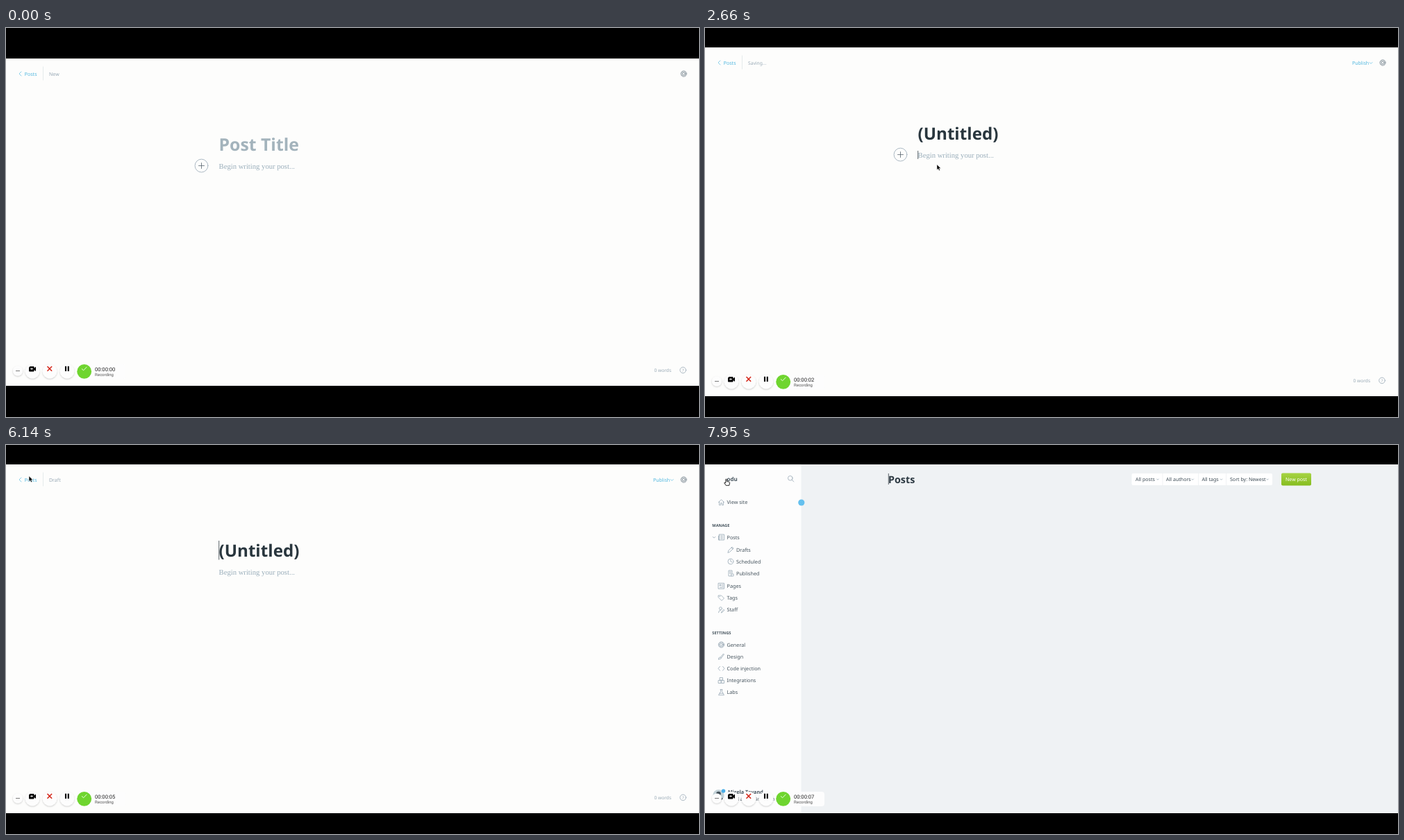
An HTML page for the animation above (8000 ms loop, 998 by 561 pixels).

```html
<!DOCTYPE html>
<html lang="en">
<head>
<meta charset="utf-8">
<title>Post editor recording</title>
<style>
  html, body { margin: 0; height: 100%; overflow: hidden; background: #000; }
  svg { display: block; width: 100vw; height: 100vh; }
  text { font: 7px "Noto Sans", "Open Sans", sans-serif; fill: #98a9b5; text-rendering: geometricPrecision; white-space: pre; }
  .line { fill: none; stroke: #98a9b5; stroke-width: .8; stroke-linecap: round; stroke-linejoin: round; }
  .blue { fill: #50b7df; }
  .line.blue { fill: none; stroke: #6cc3e5; }
  .title { font-weight: 700; }
  .body { font: 10.65px "Liberation Serif", serif; fill: #9aaebb; }
  .rec { font-family: Roboto, sans-serif; fill: #222; }
  .nav { font-size: 7.25px; fill: #46545e; }
  .section { font-size: 5.7px; font-weight: 700; fill: #46545e; }
  .filter { font-size: 7.05px; font-weight: 500; fill: #3c4a54; }
  .caret { stroke: #333d43; stroke-width: .8; }
</style>
</head>
<body>
<svg viewBox="0 0 998 561">
  <defs>
    <filter id="shadow" x="-40%" y="-40%" width="180%" height="190%">
      <feDropShadow dx="0" dy="1" stdDeviation="1" flood-opacity=".22"/>
    </filter>
    <linearGradient id="green" x2="0" y2="1">
      <stop stop-color="#a6d343"/><stop offset="1" stop-color="#86bd20"/>
    </linearGradient>
    <clipPath id="avatar"><circle cx="19.5" cy="505" r="8"/></clipPath>
    <g id="cog">
      <circle r="1.7"/><circle r="3.2"/>
      <circle r="4.2" stroke-dasharray="2.2 1.1"/>
    </g>
  </defs>
  <rect width="998" height="561"/>
  <rect id="page" width="998" fill="#fdfdfc"/>

  <g id="editor">
    <g id="head">
      <path class="line blue" d="M22 19l-3 3 3 3"/>
      <text class="blue" x="26.8" y="24.5">Posts</text>
      <path class="line" style="stroke:#dfe5e8" d="M53.5 12V31"/>
      <text id="status" x="62" y="24.5"></text>
      <g id="publish">
        <text class="blue" x="932" y="24.5">Publish</text>
        <path class="line blue" d="M957 21.5l2 2 2-2"/>
      </g>
      <use href="#cog" class="line" x="976" y="22" style="stroke:#87949c"/>
      <text id="title" class="title" x="306.5" y="133"></text>
      <text class="body" x="306.6" y="158.5">Begin writing your post...</text>
      <g id="plus">
        <circle class="line" cx="281.5" cy="154.6" r="9.4"/>
        <path class="line" style="stroke:#56636b" d="M277.5 154.6h8m-4-4v8"/>
      </g>
      <path id="bodyCaret" class="caret" d="M306.7 149v12"/>
      <path id="titleCaret" class="caret" d="M306.7 110v27.5"/>
      <rect id="focus" class="line blue" x="18" y="16.4" width="27" height="11" stroke-dasharray="2 1.5"/>
    </g>
    <g id="foot">
      <text x="933.6" y="-20" style="font-size:6.6px">0 words</text>
      <circle class="line" cx="975" cy="-22.6" r="4.3"/>
      <text x="975" y="-20.4" text-anchor="middle" style="font-size:6px">?</text>
    </g>
  </g>

  <g id="list">
    <rect y="28" width="998" height="503" fill="#eff2f4"/>
    <rect y="28" width="138.5" height="503" fill="#fdfdfd"/>
    <g id="sidebar">
      <text class="nav" x="31.5" y="52" style="font-weight:700;font-size:8px">odu</text>
      <circle class="line" cx="122.8" cy="47.8" r="3.3"/><path class="line" d="M125.2 50.2l2.6 2.8"/>
      <circle cx="138.8" cy="83" r="4.6" fill="#64c0ee"/>
      <text class="section" x="10.3" y="117.7">MANAGE</text>
      <text class="section" x="10.3" y="272.8">SETTINGS</text>
      <path class="line" d="M11.3 132.3l1.8 1.8 1.8-1.8"/>
      <g clip-path="url(#avatar)">
        <rect x="11" y="496" width="17" height="18" fill="#c4d3d9"/>
        <circle cx="19.5" cy="503" r="3.3" fill="#435159"/>
        <ellipse cx="19.5" cy="512" rx="6.5" ry="5" fill="#435159"/>
      </g>
      <circle cx="26.5" cy="499" r="2.8" fill="#4aaee8"/>
      <text class="nav" x="33" y="503" style="font-weight:700">Mirela Tovand</text>
      <text class="nav" x="33" y="513" style="font-size:6.6px">mirel at quellin &amp; wend</text>
    </g>
    <g id="postsHeader">
      <path class="caret" d="M264.3 41v16"/>
      <text class="title" x="264" y="54.5" style="font-size:14.3px;fill:#2d3a43">Posts</text>
      <rect x="614.5" y="41" width="202.5" height="17" rx="2" fill="#fff"/>
      <path class="line" style="stroke:#edf0f2" d="M659 41v17M710.5 41v17M750.5 41v17"/>
      <rect x="830" y="40.5" width="43" height="18" rx="2" fill="url(#green)"/>
      <text x="836" y="52" style="fill:#fff;font-weight:500">New post</text>
    </g>
  </g>

  <g id="recorder">
    <rect x="100" y="-31" width="72" height="21" rx="4" fill="#fdfdfd"/>
    <g fill="#fdfdfd" filter="url(#shadow)">
      <circle cx="17" cy="-21.5" r="7"/>
      <circle cx="38" cy="-21" r="10.3"/>
      <circle cx="63" cy="-21" r="10.3"/>
      <circle cx="88" cy="-21" r="10.3"/>
    </g>
    <circle cx="112.7" cy="-20.6" r="10.4" fill="#6fd52f"/>
    <path d="M14.4 -21.5h1.2m.8 0h1.2m.8 0h1.2" stroke="#222" stroke-width="1.2"/>
    <path d="M34 -28h5.5q1 0 1 1v1.6l2.5-2v6.4l-2.5-2v1.5q0 1-1 1h-5.5q-1 0-1-1v-4.5q0-1 1-1z"/>
    <path d="M35 -24.5h4m-2-1.7v3.4" stroke="#fff" stroke-width=".8"/>
    <path d="M59.5 -28l6.6 6.8m0-6.8l-6.6 6.8" stroke="#d52b1e" stroke-width="1.6"/>
    <path d="M86 -28.3v7.4m3.8-7.4v7.4" stroke="#000" stroke-width="2.1"/>
    <path d="M109 -24.6l2.6 2.4 4.8-5" fill="none" stroke="#e9ffdd" stroke-width="1"/>
    <text id="timer" class="rec" x="128" y="-21" style="font-size:7.6px"></text>
    <text class="rec" x="128" y="-13.6" style="font-size:6px;fill:#555">Recording</text>
  </g>

  <path id="arrow" d="M0 0v7.8l1.8-1.6 1.3 2.7 1.4-.7-1.3-2.5h2.5z" stroke="#fff" stroke-width=".5"/>
  <path id="hand" d="M-.8 0q.9-.8 1.6.2v2.8l3.4.8q1 .4.8 1.4l-.8 3.6h-4.6l-2.4-3.4q0-1.2 1.2-.7l.8.6z" fill="#fff" stroke="#111" stroke-width=".9"/>
</svg>
<script>
const $ = id => document.getElementById(id);
const show = (id, on) => $(id).style.display = on ? '' : 'none';
const move = (id, x, y) => $(id).setAttribute('transform', `translate(${x} ${y})`);
const add = (parent, markup) => $(parent).insertAdjacentHTML('beforeend', markup);

// Line icons, drawn around their centre.
const icons = {
  home: 'M-4 0L0-4 4 0M-3-1v5h2V1h2v3h2v-5',
  post: 'M-3-4h7v8h-8v-6h1zM-3-2v6M-1-2h3M-1 0h3M-1 2h3',
  pencil: 'M-4 4l1-3 5-5 2 2-5 5zM1-3l2 2',
  clock: 'M4 0a4 4 0 1 1-8 0a4 4 0 1 1 8 0M0-2.5v2.5l2 1',
  published: 'M1 4h-4v-8h5v4M-1.5-2h2M-1.5 0h2M1 1h3v3h-3z',
  page: 'M-4-4h8v8h-8zM-2-2h1.5v1.5h-1.5zM1-2h1.5M1 0h1.5M-2 2h4.5',
  tag: 'M-4-3.5h4l4 4-3.5 3.5-4.5-4.5zM-2.5-2h.5',
  staff: 'M1-2a2 2 0 1 1-4 0a2 2 0 1 1 4 0M-4 4q0-3.5 3-3.5M0 4l1-2 2.5-2.5 1 1-2.5 2.5z',
  brush: 'M-4 4q0-3 2-3l2 1q0 2-4 2M-1 1l4-5 1 1-4 5',
  code: 'M-2-3l-2.5 3 2.5 3M2-3l2.5 3-2.5 3',
  blocks: 'M-2-4h4v3.5h-4zM-4 0h3.5v4h-3.5zM.5 0h3.5v4h-3.5z',
  flask: 'M-1.5-4h3M-1-4v3l-3 5h8l-3-5v-3M-2.5 1.5h5'
};
const navItems = [
  ['View site', 'home', 82.7], ['Posts', 'post', 133],
  ['Drafts', 'pencil', 151, 13.5], ['Scheduled', 'clock', 168, 13.5], ['Published', 'published', 185, 13.5],
  ['Pages', 'page', 203.3], ['Tags', 'tag', 220.5], ['Staff', 'staff', 237.7],
  ['General', 'cog', 288], ['Design', 'brush', 305], ['Code injection', 'code', 322.3],
  ['Integrations', 'blocks', 339.5], ['Labs', 'flask', 356.7]
];
for (const [label, icon, y, indent = 0] of navItems) {
  const x = 23.5 + indent;
  add('sidebar', `<text class="nav" x="${x + 8}" y="${y + 2.5}">${label}</text>` +
    (icon === 'cog' ? `<use href="#cog" class="line" x="${x}" y="${y}"/>`
      : `<path class="line" transform="translate(${x} ${y})" d="${icons[icon]}"/>`));
}
const filters = [['All posts', 620, 652], ['All authors', 664, 702.3], ['All tags', 715.5, 743.5], ['Sort by: Newest', 756, 810]];
for (const [label, x, chevron] of filters) {
  add('postsHeader', `<text class="filter" x="${x}" y="52">${label}</text>
    <path class="line" d="M${chevron - 1.3} 49l1.3 1.3 1.3-1.3"/>`);
}

// Pointer waypoints: time, x, y.
const pointer = [
  [1160, 998, 520], [1220, 993, 514], [1730, 520, 290], [1960, 520, 290], [2230, 334, 197],
  [2660, 334, 197], [2950, 326, 156], [3060, 326, 156], [3450, 92, 62], [3510, 88, 58],
  [3730, 68, 42], [3970, 50, 31], [4250, 34, 43], [6070, 34, 43], [6330, 30.6, 49.5]
];
const clamp = v => Math.max(0, Math.min(1, v));

function pointerAt(t) {
  const next = pointer.findIndex(p => p[0] > t);
  if (next < 1) return (next ? pointer.at(-1) : pointer[0]).slice(1);
  const [t0, x0, y0] = pointer[next - 1], [t1, x1, y1] = pointer[next];
  const k = (t - t0) / (t1 - t0);
  return [x0 + (x1 - x0) * k, y0 + (y1 - y0) * k];
}

function render(t) {
  const grow = clamp((t - 970) / 760);
  const top = Math.round(44 - 16 * grow), bottom = Math.round(516 + 15 * grow);
  $('page').setAttribute('y', top);
  $('page').setAttribute('height', bottom - top);
  move('head', 0, top);
  move('foot', 0, bottom);
  move('recorder', 0, bottom);

  const untitled = t >= 2390, titleFocused = t >= 3010;
  $('status').textContent = t < 2390 ? 'New' : t < 5570 ? 'Saving...' : 'Draft';
  $('status').style.fontSize = untitled && t < 5570 ? '6.7px' : '7px';
  $('title').textContent = untitled ? '(Untitled)' : 'Post Title';
  $('title').style.fontSize = untitled ? '24.2px' : '24.8px';
  $('title').style.fill = untitled ? '#29363e' : '#a3b3bc';
  $('timer').textContent = '00:00:0' + Math.max(0, Math.floor((t - 210) / 1000));

  const blink = Math.floor((t - 4810) / 600) % 2 === 0;
  show('bodyCaret', blink && t >= 2390 && !titleFocused);
  show('titleCaret', blink && titleFocused && t < 7400);
  show('plus', !titleFocused);
  show('publish', t >= 2660);
  show('focus', t >= 7400);
  show('editor', t < 7750);
  show('list', t >= 7750);
  show('postsHeader', t >= 7950);

  const [x, y] = pointerAt(t);
  show('arrow', t >= 1160 && t < 6200);
  show('hand', t >= 6200);
  move('arrow', x, y);
  move('hand', x, y);
}

const start = performance.now();
function frame() {
  render((performance.now() - start) % 8000);
  requestAnimationFrame(frame);
}
frame();
</script>
</body>
</html>
```
